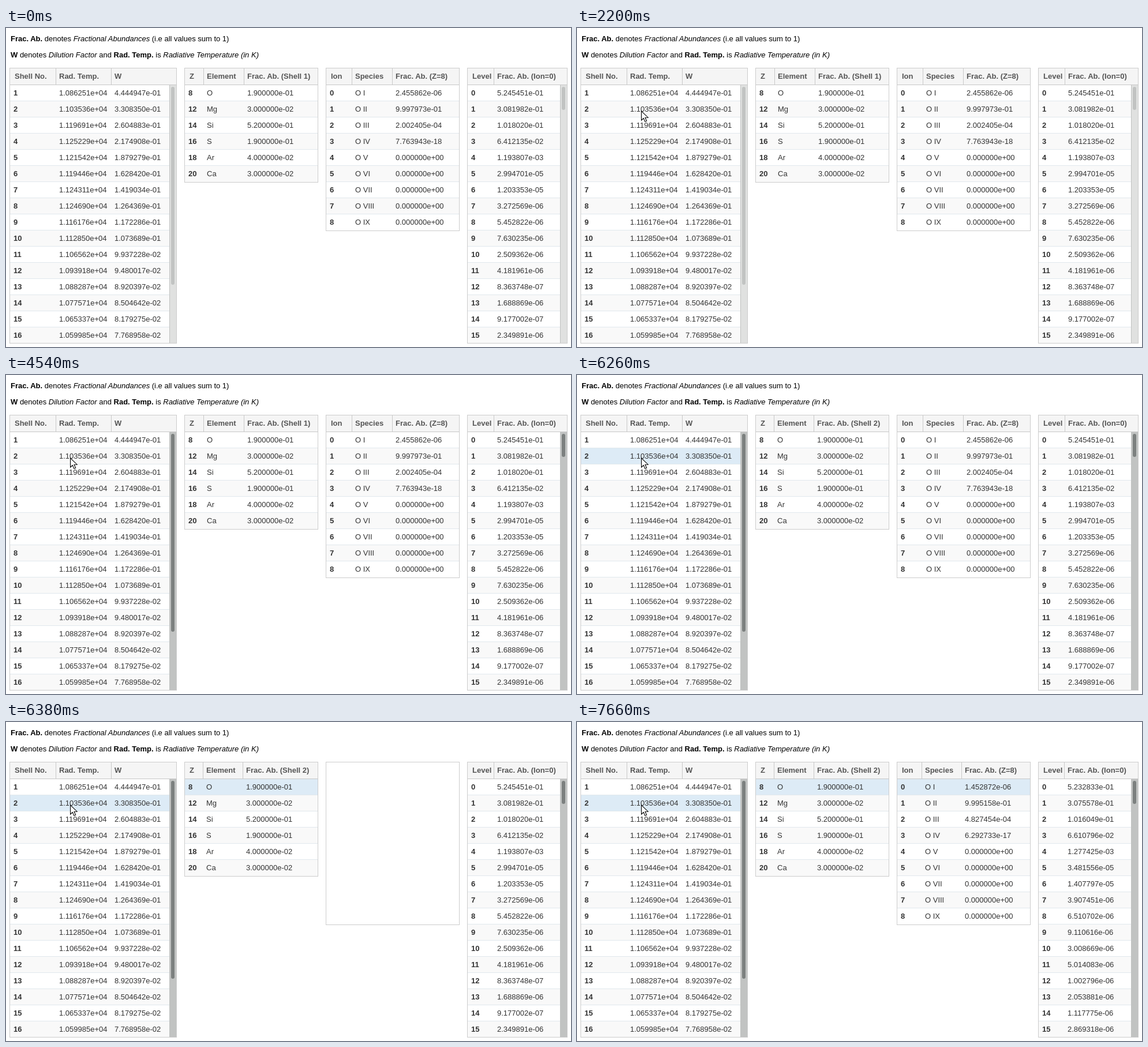
An HTML page for the animation above (8 s loop, 979 by 553 pixels).

```html
<!DOCTYPE html>
<html lang="en">
<head>
<meta charset="utf-8">
<title>Shell abundances</title>
<style>
html, body { margin: 0; width: 100%; height: 100%; overflow: hidden; background: #fff; }
body { position: relative; font: 13px/27px "Liberation Sans", Arial, sans-serif; color: #000; white-space: pre; }
p { position: absolute; left: 8px; margin: 0; }
.grid { position: absolute; top: 69px; box-sizing: border-box; border: 1px solid #ccc; overflow: hidden; }
.layer { position: absolute; inset: 0; }
.head { position: relative; height: 28px; background: #f5f5f5; border-bottom: 1px solid #c8c8c8; color: #555; font-weight: bold; }
.head i { position: absolute; top: 0; width: 1px; height: 28px; background: #c8c8c8; }
.row { position: relative; height: 27px; border-bottom: 1px solid #e1e8ed; color: #333; }
.row:nth-child(odd) { background: #f9f9f9; }
.row:last-child { border-bottom-color: transparent; }
.head span, .row span { position: absolute; top: 0; }
.row span:first-child { font-weight: bold; }
.bar { position: absolute; top: 29px; right: 0; bottom: 0; width: 11px; border-left: 1px solid #c0c2c1; background: #e0e1e0; }
.thumb { position: absolute; left: 2px; top: 3px; width: 6px; border-radius: 3px; background: #c1c3c2; }
#cursor { position: absolute; left: 0; top: 0; width: 14px; height: 21px; }

/* Every change is a hard cut on one 8 s clock */
.layer, .row, .bar, .thumb, #cursor { animation: 8s step-end infinite; }
#cursor { animation-name: move; }
.bar { animation-name: track; }
.thumb { animation-name: thumb; }
.pick-shell { animation-name: pickShell; }
.pick-element { animation-name: pickElement; }
.pick-ion { animation-name: pickIon; }
.element-old { animation-name: elementOut; }
.element-new { animation-name: elementIn; }
.ion-old { animation-name: ionOut; }
.ion-new { animation-name: ionIn; }
.level-old { animation-name: levelOut; }
.level-new { animation-name: levelIn; }

@keyframes move {
  0% { opacity: 0; transform: translate(158px, 81px); }
  6.25% { opacity: 1; transform: translate(158px, 81px); }
  9.75% { opacity: 1; transform: translate(135px, 133px); }
  13.25% { opacity: 1; transform: translate(121px, 164px); }
  17% { opacity: 1; transform: translate(115px, 166px); }
  20.5% { opacity: 1; transform: translate(111px, 151px); }
  24% { opacity: 1; transform: translate(111px, 146px); }
  27.5%, 100% { opacity: 1; transform: translate(111px, 143px); }
}
@keyframes track { 56.75%, 100% { background: #c1c3c2; } }
@keyframes thumb { 56.75%, 100% { background: #7c807f; } }
@keyframes pickShell { 64.25%, 100% { background: #ddebf6; } }
@keyframes pickElement { 79.75%, 100% { background: #ddebf6; } }
@keyframes pickIon { 95.75%, 100% { background: #ddebf6; } }
@keyframes elementOut { 0% { opacity: 1; } 78.25%, 100% { opacity: 0; } }
@keyframes elementIn { 0% { opacity: 0; } 78.25%, 100% { opacity: 1; } }
@keyframes ionOut { 0% { opacity: 1; } 79.75%, 100% { opacity: 0; } }
@keyframes ionIn { 0% { opacity: 0; } 85.25%, 100% { opacity: 1; } }
@keyframes levelOut { 0% { opacity: 1; } 95.75%, 100% { opacity: 0; } }
@keyframes levelIn { 0% { opacity: 0; } 95.75%, 100% { opacity: 1; } }
</style>
</head>
<body>
<p style="top:5px"><b>Frac. Ab.</b> denotes <em>Fractional Abundances</em> (i.e all values sum to 1)</p>
<p style="top:33px"><b>W</b> denotes <em>Dilution Factor</em> and <b>Rad. Temp.</b> is <em>Radiative Temperature (in K)</em></p>
<script>
const words = s => s.trim().split(/\s+/);
const count = (n, from = 0) => Array.from({ length: n }, (_, i) => i + from);

// seps: column dividers, measured from the inner left edge of the grid
function layer({ name = '', heads, seps, cols, pick, pickName }) {
  const line = (texts, first) => texts.map((t, i) =>
    `<span style="left:${i ? seps[i - 1] + 6 : first}px">${t}</span>`).join('');
  const dividers = seps.map(x => `<i style="left:${x}px"></i>`).join('');
  const rows = cols[0].map((_, r) =>
    `<div class="row ${r === pick ? pickName : ''}">${line(cols.map(c => c[r]), 6)}</div>`).join('');
  return `<div class="layer ${name}"><div class="head">${dividers}${line(heads, 8)}</div>${rows}</div>`;
}

function grid(x, width, height, layers, thumb) {
  const bar = thumb ? `<div class="bar"><div class="thumb" style="height:${thumb}px"></div></div>` : '';
  document.body.insertAdjacentHTML('beforeend',
    `<div class="grid" style="left:${x}px;width:${width}px;height:${height}px">${layers.map(layer).join('')}${bar}</div>`);
}

const temps = words(`1.086251e+04 1.103536e+04 1.119691e+04 1.125229e+04 1.121542e+04 1.119446e+04
  1.124311e+04 1.124690e+04 1.116176e+04 1.112850e+04 1.106562e+04 1.093918e+04
  1.088287e+04 1.077571e+04 1.065337e+04 1.059985e+04`);
const dilution = words(`4.444947e-01 3.308350e-01 2.604883e-01 2.174908e-01 1.879279e-01 1.628420e-01
  1.419034e-01 1.264369e-01 1.172286e-01 1.073689e-01 9.937228e-02 9.480017e-02
  8.920397e-02 8.504642e-02 8.179275e-02 7.768958e-02`);
grid(6, 290, 478, [{
  heads: ['Shell No.', 'Rad. Temp.', 'W'], seps: [79, 175],
  cols: [count(16, 1), temps, dilution], pick: 1, pickName: 'pick-shell'
}], 343);

const elements = [words('8 12 14 16 18 20'), words('O Mg Si S Ar Ca'),
  words('1.900000e-01 3.000000e-02 5.200000e-01 1.900000e-01 4.000000e-02 3.000000e-02')];
const elementHeads = n => ['Z', 'Element', `Frac. Ab. (Shell ${n})`];
grid(309, 232, 199, [
  { name: 'element-old', heads: elementHeads(1), seps: [32, 102], cols: elements },
  { name: 'element-new', heads: elementHeads(2), seps: [31, 100], cols: elements, pick: 0, pickName: 'pick-element' }
]);

const species = words('I II III IV V VI VII VIII IX').map(n => 'O ' + n);
const ionHeads = ['Ion', 'Species', 'Frac. Ab. (Z=8)'];
const ions = s => [count(9), species, [...words(s), ...Array(5).fill('0.000000e+00')]];
grid(554, 232, 283, [
  { name: 'ion-old', heads: ionHeads, seps: [44, 114],
    cols: ions('2.455862e-06 9.997973e-01 2.002405e-04 7.763943e-18') },
  { name: 'ion-new', heads: ionHeads, seps: [42, 111],
    cols: ions('1.452872e-06 9.995158e-01 4.827454e-04 6.292733e-17'), pick: 0, pickName: 'pick-ion' }
]);

const levelHeads = ['Level', 'Frac. Ab. (Ion=0)'];
const levels = s => [count(16), words(s)];
grid(799, 174, 478, [
  { name: 'level-old', heads: levelHeads, seps: [45],
    cols: levels(`5.245451e-01 3.081982e-01 1.018020e-01 6.412135e-02 1.193807e-03 2.994701e-05
      1.203353e-05 3.272569e-06 5.452822e-06 7.630235e-06 2.509362e-06 4.181961e-06
      8.363748e-07 1.688869e-06 9.177002e-07 2.349891e-06`) },
  { name: 'level-new', heads: levelHeads, seps: [44],
    cols: levels(`5.232833e-01 3.075578e-01 1.016049e-01 6.610796e-02 1.277425e-03 3.481556e-05
      1.407797e-05 3.907451e-06 6.510702e-06 9.110616e-06 3.008669e-06 5.014083e-06
      1.002796e-06 2.053881e-06 1.117775e-06 2.869318e-06`) }
], 40);

document.body.insertAdjacentHTML('beforeend',
  `<svg id="cursor" viewBox="0 0 14 21"><path d="M.6 1.2V17L4.3 13.5 6.9 19.4 9.7 18.2 7.1 12.4 12.1 12.2Z"
    fill="#fff" stroke="#000" stroke-width="1.1"/></svg>`);
</script>
</body>
</html>
```
